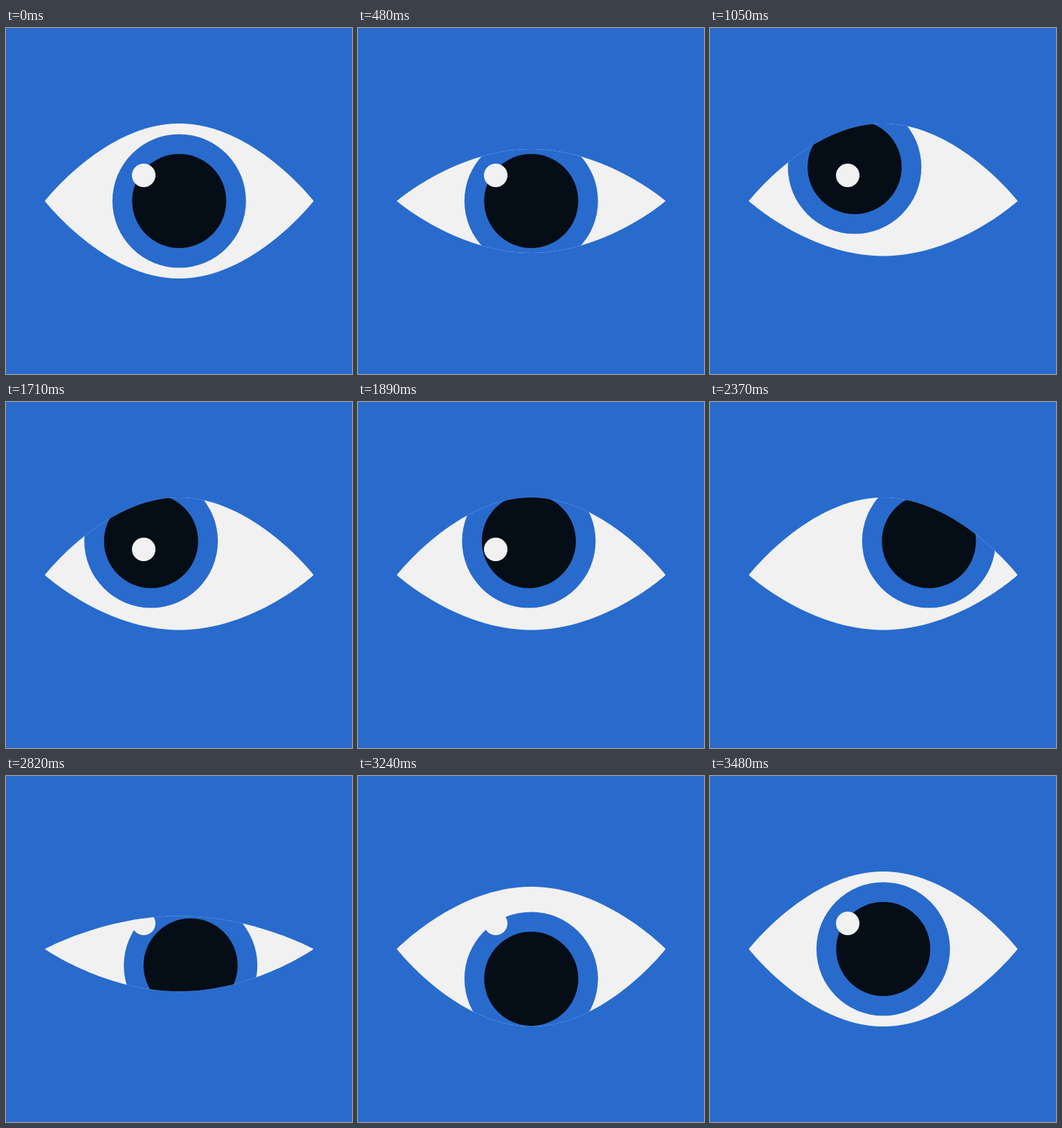
Recreate the animation shown at these times as an HTML page with a canvas. Size 500 by 500 pixels, loop 4.23 s.

```html
<!DOCTYPE html>
<html lang="en">
<head>
<meta charset="utf-8">
<title>Blinking eye</title>
<style>
html, body { margin: 0; width: 100%; height: 100%; overflow: hidden; background: #286bcd; }
canvas { display: block; width: 500px; height: 500px; }
</style>
</head>
<body>
<canvas id="stage" width="500" height="500"></canvas>
<script>
const ctx = document.getElementById('stage').getContext('2d');
const LOOP = 4230, STEP = 30;
const BLUE = '#286bcd', WHITE = '#f1f1f1', BLACK = '#050d16';
const CX = 250.3, CY = 250;
const HALF = 194.3, BEND = 107;

// Cubic easing with horizontal end tangents; a and b are the handle times.
function ease(a, b) {
  return u => {
    let lo = 0, hi = 1;
    for (let i = 0; i < 24; i++) {
      const s = (lo + hi) / 2, r = 1 - s;
      const x = 3 * s * r * r * a + 3 * s * s * r * b + s * s * s;
      if (x < u) lo = s; else hi = s;
    }
    return lo * lo * (3 - 2 * lo);
  };
}
const smooth = ease(1 / 3, 2 / 3);
const glide = ease(1 / 3, 1 / 3);
const drop = ease(1 / 3, 0.65);

// Each move: start, end, new value, easing.
const tracks = {
  x: [CX, [840, 1050, 209], [1680, 2370, 316.3, glide], [2640, 2910, CX, drop], [3180, 3480, CX]],
  y: [CY, [840, 1050, 201], [2640, 2910, 298, drop], [3180, 3480, CY]],
  top: [112, [150, 480, 75], [840, 1050, 112], [2610, 2718, 0], [2718, 2910, 87.4], [3180, 3480, 112]],
  bottom: [112, [150, 480, 75], [840, 1050, 79.5], [2610, 2718, 0], [2718, 2910, 112]]
};

function valueAt([value, ...moves], t) {
  for (const [start, end, to, curve = smooth] of moves) {
    if (t <= start) break;
    value += (to - value) * (t >= end ? 1 : curve((t - start) / (end - start)));
  }
  return value;
}

function disc(x, y, r, color) {
  ctx.fillStyle = color;
  ctx.beginPath();
  ctx.arc(x, y, r, 0, Math.PI * 2);
  ctx.fill();
}

function lidPath(top, bottom) {
  const l = CX - HALF, r = CX + HALF, up = CY - top, down = CY + bottom;
  ctx.beginPath();
  ctx.moveTo(l, CY);
  ctx.bezierCurveTo(l, CY, CX - BEND, up, CX, up);
  ctx.bezierCurveTo(CX + BEND, up, r, CY, r, CY);
  ctx.bezierCurveTo(r, CY, CX + BEND, down, CX, down);
  ctx.bezierCurveTo(CX - BEND, down, l, CY, l, CY);
  ctx.closePath();
}

function draw(t) {
  const x = valueAt(tracks.x, t), y = valueAt(tracks.y, t);
  ctx.fillStyle = BLUE;
  ctx.fillRect(0, 0, 500, 500);
  ctx.save();
  lidPath(valueAt(tracks.top, t), valueAt(tracks.bottom, t));
  ctx.clip();
  ctx.fillStyle = WHITE;
  ctx.fillRect(0, 0, 500, 500);
  disc(x, y, 96.5, BLUE);
  disc(x, y, 68, BLACK);
  disc(199, 213, 17, WHITE);
  ctx.restore();
}

const begin = performance.now();
function tick() {
  const t = (performance.now() - begin) % LOOP;
  draw(Math.floor(t / STEP) * STEP);
  requestAnimationFrame(tick);
}
tick();
</script>
</body>
</html>
```
